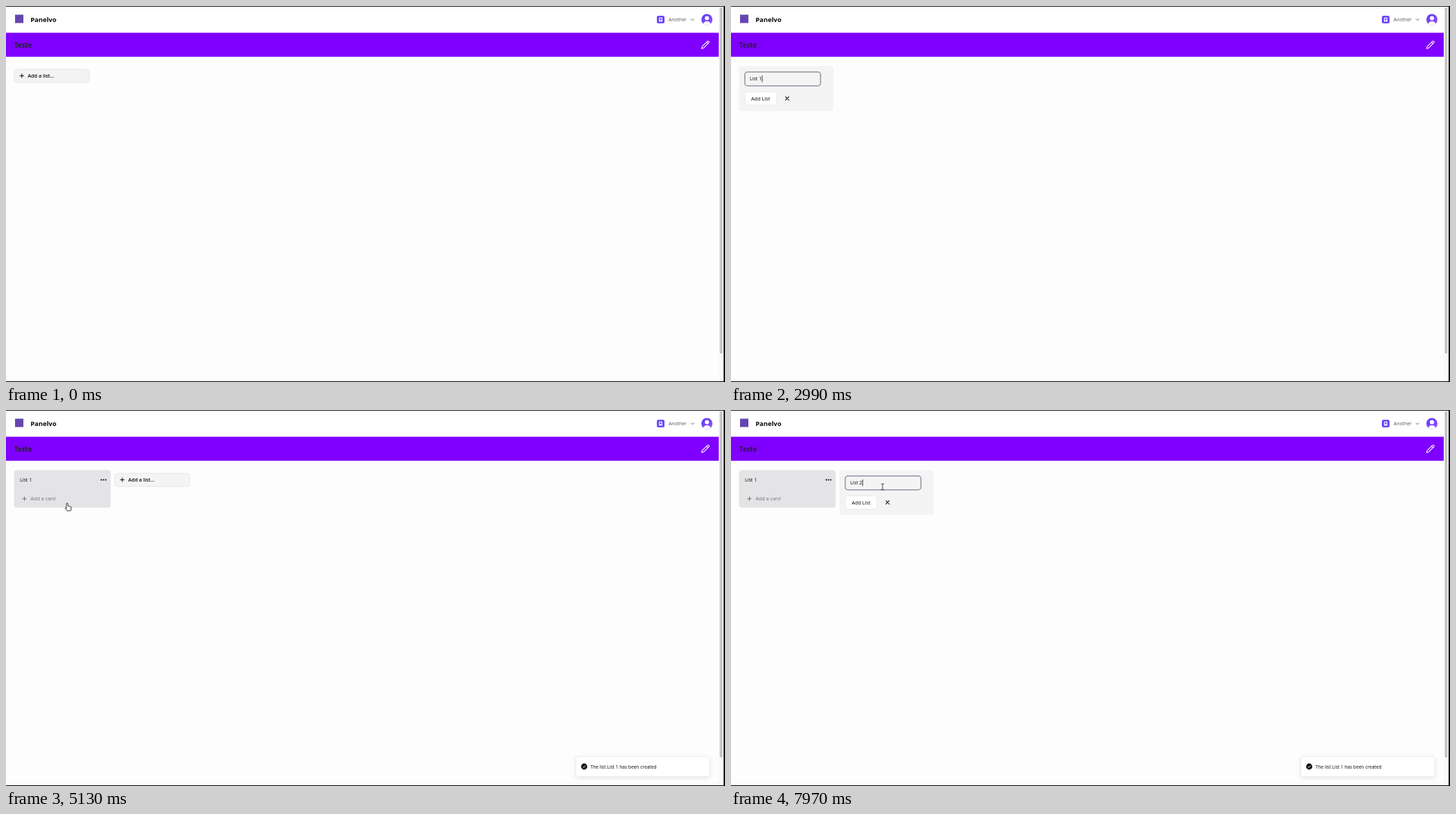
Recreate the animation shown at these times as an HTML page with a canvas. Size 1034x541 px, loop 8 s.

```html
<!DOCTYPE html>
<html lang="en">
<head>
<meta charset="utf-8">
<title>Board</title>
<style>
  html, body { margin: 0; width: 100%; height: 100%; overflow: hidden; background: #fdfdfd; }
  canvas { display: block; width: 1034px; height: 541px; }
</style>
</head>
<body>
<canvas id="stage"></canvas>
<script>
const W = 1034, H = 541, LOOP = 8000;
const canvas = document.getElementById('stage');
const g = canvas.getContext('2d');
const dpr = window.devicePixelRatio || 1;
canvas.width = W * dpr;
canvas.height = H * dpr;

const INK = '#09090b', MUTED = '#71717a', PALE = '#f4f4f5', LINE = '#e4e4e7', VIOLET = '#6c47ff';
const BLINK = 535, SHIFT = 144.4;

// Moments of the session, in ms
const ENTER = 130, OPEN_1 = 940, CREATED = 4670, OPEN_2 = 5420;
const entries = [
  { value: 'List 1', focus: 1570, keys: [2280, 2440, 2540, 2710, 2810, 2990] },
  { value: 'List 2', focus: 6080, keys: [6750, 6910, 6980, 7220, 7290, 7490] }
];
const hiddenSpans = [[2240, 4140], [6680, 7930]];

// Pointer path: time, x, y
const path = [
  [130, -3, 35], [400, 42, 66], [620, 97, 103], [860, 52, 101], [940, 50, 102],
  [1300, 55, 105], [1640, 52, 104], [4070, 52, 104], [4140, 70, 111], [4210, 73, 115],
  [4860, 73, 115], [5130, 88, 134], [5380, 209, 104], [5420, 210, 104], [5730, 215, 118],
  [5900, 215, 118], [5970, 216, 110], [6140, 218, 110.5], [8000, 218, 110.5]
];

function box(x0, y0, x1, y1, r, fill, stroke, width = 1) {
  g.beginPath();
  g.roundRect(x0, y0, x1 - x0, y1 - y0, r);
  if (fill) { g.fillStyle = fill; g.fill(); }
  if (stroke) { g.strokeStyle = stroke; g.lineWidth = width; g.stroke(); }
}

function disc(x, y, r, fill) {
  g.beginPath();
  g.arc(x, y, r, 0, Math.PI * 2);
  g.fillStyle = fill;
  g.fill();
}

function rect(x, y, w, h, fill) {
  g.fillStyle = fill;
  g.fillRect(x, y, w, h);
}

function label(text, x, y, size, weight = 400, color = INK) {
  g.font = `${weight} ${size}px "Open Sans", "Noto Sans", sans-serif`;
  g.fillStyle = color;
  g.fillText(text, x, y);
  return g.measureText(text).width;
}

function lines(d, x, y, scale, color, width, fill) {
  const shape = new Path2D(d);
  g.save();
  g.translate(x, y);
  g.scale(scale, scale);
  g.lineWidth = width / scale;
  g.lineCap = g.lineJoin = 'round';
  if (fill) { g.fillStyle = fill; g.fill(shape); }
  g.strokeStyle = color;
  g.stroke(shape);
  g.restore();
}

const plus = (x, y, color) => lines('M-2.7 0H2.7M0-2.7V2.7', x, y, 1, color, 1);

function drawAvatar() {
  const tint = g.createLinearGradient(1000, 12, 1016, 27);
  tint.addColorStop(0, '#5b3df5');
  tint.addColorStop(1, '#9a4dfa');
  g.save();
  g.beginPath();
  g.arc(1008, 19.5, 8, 0, Math.PI * 2);
  g.clip();
  rect(1000, 11, 16, 17, tint);
  disc(1008, 17.6, 3, '#fff');
  g.beginPath();
  g.ellipse(1008, 27, 5.6, 4.9, 0, 0, Math.PI * 2);
  g.fill();
  g.restore();
}

function drawPage() {
  rect(0, 0, W, H, '#fdfdfd');
  rect(0, 1, 1025, 37.5, '#fff');
  rect(0, 38.5, 1025, 34.5, '#8000ff');

  rect(13, 12.5, 12, 12, '#6546b0');
  label('Panelvo', 35.2, 23.4, 9.4, 700);

  box(936, 14, 947, 25, 2.5, VIOLET);
  lines('M939.8 22.2V17H943.2V22.2L941.5 20.8Z', 0, 0, 1, '#fff', 1.2);
  label('Another', 953, 22.3, 6.8, 400, '#55555e');
  lines('M-2-1L0 1L2-1', 987.3, 19.8, 1, '#55555e', 0.9);
  drawAvatar();

  label('Teste', 11.8, 60.2, 9.7, 700, '#2a1a3c');
  lines('M17 3a2.85 2.83 0 1 1 4 4L7.5 20.5 2 22l1.5-5.5ZM15 5l4 4', 999.3, 49.4, 0.54, '#fff', 1.1);
}

function drawEdges() {
  rect(1025, 1, 7, 539, '#fafafa');
  box(1026.5, 2, 1030.5, 500, 1.5, '#c4c4c4');
  rect(1032, 0, 2, H, '#000');
  rect(0, 0, W, 1, '#1c1c1c');
  rect(0, 540, W, 1, '#000');
}

function drawAddButton(dx) {
  box(12 + dx, 91.2, 119.6 + dx, 110, 4, PALE, LINE, 0.9);
  plus(22.8 + dx, 100.4, INK);
  label('Add a list...', 31.3 + dx, 103, 7.2, 600);
}

function drawInput(t, dx, entry) {
  const focused = t >= entry.focus;
  box(20 + dx, 95.2, 128.5 + dx, 114.6, 4, PALE, LINE, 0.9);
  if (focused) {
    g.globalAlpha = Math.min(1, (t - entry.focus + 30) / 90);
    box(19.9 + dx, 94.9, 128.8 + dx, 114.9, 4, null, '#a3a2af', 1.8);
    g.globalAlpha = 1;
  }
  const typed = entry.keys.filter(k => k <= t).length;
  const x = 27 + dx;
  let end = x;
  if (typed) end += label(entry.value.slice(0, typed), x, 107.4, 7.1);
  else label('Enter list title...', x, 107.4, 7.25, 400, MUTED);

  const last = typed ? entry.keys[typed - 1] : entry.focus;
  if (focused && Math.floor((t - last) / BLINK) % 2 === 0) rect(end + 0.2, 100, 0.8, 9.4, INK);
}

function drawForm(t, dx, entry) {
  box(11.5 + dx, 86.5, 147 + dx, 151.2, 4, PALE);
  drawInput(t, dx, entry);
  box(20.2 + dx, 123.6, 65.6 + dx, 142.6, 4, '#fff', '#e8e8eb', 0.8);
  label('Add List', 29 + dx, 135.6, 7.3, 500);
  lines('M-2.3-2.3L2.3 2.3M2.3-2.3L-2.3 2.3', 80.8 + dx, 133, 1, INK, 1.1);
}

function drawList() {
  box(11.5, 86.5, 150.5, 140.5, 4, LINE);
  label('List 1', 20, 103, 7.1, 500);
  for (const x of [137, 140.2, 143.4]) disc(x, 100.5, 1.1, INK);
  plus(26.5, 127.7, MUTED);
  label('Add a card', 35.2, 130.3, 7.25, 500, MUTED);
}

function drawToast(age) {
  const p = Math.min(1, age / 400);
  const ease = 1 - (1 - p) ** 3;
  g.save();
  g.globalAlpha = ease;
  g.translate(0, (1 - ease) * 30);
  g.shadowColor = 'rgba(0,0,0,.1)';
  g.shadowBlur = 7 * dpr;
  g.shadowOffsetY = 2 * dpr;
  box(819.5, 498.7, 1012, 527.4, 4, '#fff');
  g.shadowColor = 'transparent';
  box(819.5, 498.7, 1012, 527.4, 4, null, '#e9e9ec', 0.8);
  disc(831.5, 513, 4.4, INK);
  lines('M-1.8.1L-.5 1.4L1.9-1.2', 831.5, 513, 1, '#fff', 1);
  label('The list List 1 has been created', 840.5, 515.5, 6.65);
  g.restore();
}

function pointerAt(t) {
  const i = path.findIndex(k => k[0] > t);
  const [t0, x0, y0] = path[i - 1], [t1, x1, y1] = path[i];
  const p = (t - t0) / (t1 - t0), s = p * p * (3 - 2 * p);
  return [x0 + (x1 - x0) * s, y0 + (y1 - y0) * s];
}

function pointerKind(x, y, formDx, buttonDx, hasList) {
  const over = (x0, y0, x1, y1) => x >= x0 && x <= x1 && y >= y0 && y <= y1;
  if (hasList && over(20, 119, 142, 137)) return 'hand';
  if (formDx === null) return over(12 + buttonDx, 91, 120 + buttonDx, 110) ? 'hand' : 'arrow';
  if (over(20 + formDx, 95, 128 + formDx, 114.5)) return 'beam';
  return over(20 + formDx, 123, 66 + formDx, 143) ? 'hand' : 'arrow';
}

const pointers = {
  arrow: (x, y) => lines('M0 0V9.4L2.2 7.4L3.7 10.6L5.1 10L3.7 6.9H6.6Z', x, y, 1, '#222', 0.8, '#fff'),
  hand: (x, y) => lines('M-1 6V.5Q0-1 1 .5V4L5 5Q6 5.4 5.8 7L5 11H0L-3 7.2Q-3 5.4-1 7Z', x, y, 1, '#222', 0.9, '#fff'),
  beam: (x, y) => lines('M-1.8-4.2H-.6L0-3.7L.6-4.2H1.8M0-3.7V3.7M-1.8 4.2H-.6L0 3.7L.6 4.2H1.8', x, y, 1, '#333', 0.9)
};

function draw(t) {
  g.setTransform(dpr, 0, 0, dpr, 0, 0);
  drawPage();

  const hasList = t >= CREATED;
  const dx = hasList ? SHIFT : 0;
  const open = hasList ? t >= OPEN_2 : t >= OPEN_1;
  if (hasList) drawList();
  if (open) drawForm(t, dx, entries[hasList ? 1 : 0]);
  else drawAddButton(dx);
  if (hasList) drawToast(t - CREATED);

  const hidden = t < ENTER || hiddenSpans.some(([a, b]) => t >= a && t < b);
  if (!hidden) {
    const [x, y] = pointerAt(t);
    pointers[pointerKind(x, y, open ? dx : null, dx, hasList)](x, y);
  }
  drawEdges();
}

const start = performance.now();
function tick() {
  draw((performance.now() - start) % LOOP);
  requestAnimationFrame(tick);
}
tick();
</script>
</body>
</html>
```
